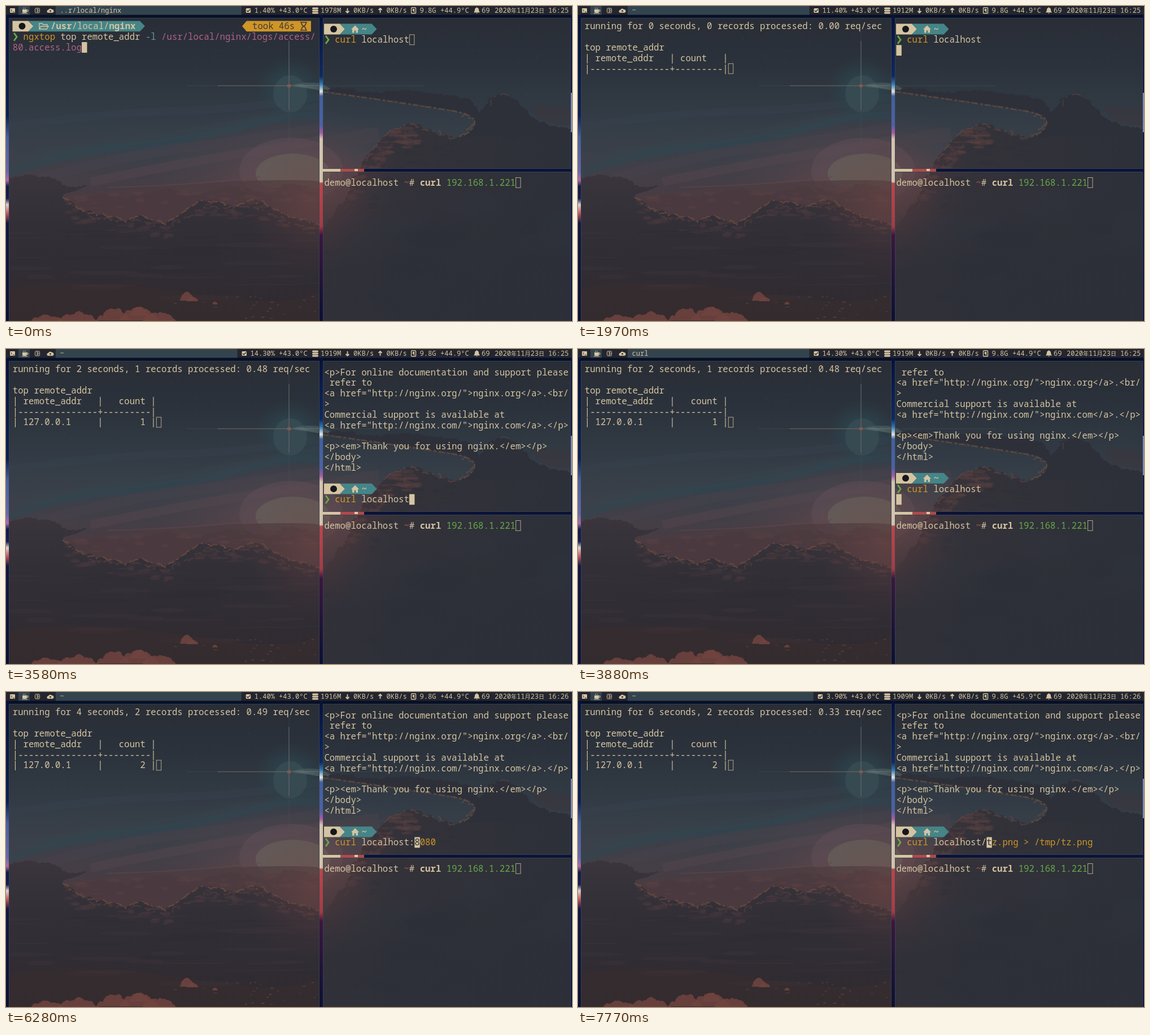
Write an HTML page that moves like this. It is 1002 px wide and 559 px high and loops after 8000 ms.

```html
<!DOCTYPE html>
<html lang="en">
<head>
<meta charset="utf-8">
<title>Terminal session</title>
<style>
html, body { margin: 0; width: 100%; height: 100%; overflow: hidden; background: #23262f; }
svg { display: block; width: 1002px; height: 559px; }
text { white-space: pre; font: 15.68px "Noto Sans Mono", "DejaVu Sans Mono", monospace; }
.bar text { font-size: 12.1px; }
.bar .cjk { font: 10px "Noto Sans CJK SC", "Noto Sans CJK JP", "Noto Sans CJK", sans-serif; }
</style>
</head>
<body>
<svg viewBox="0 0 1002 559">
  <defs>
    <linearGradient id="sky" gradientUnits="userSpaceOnUse" x1="0" y1="21" x2="0" y2="360">
      <stop offset="0" stop-color="#292d36"/><stop offset=".25" stop-color="#2b323b"/>
      <stop offset=".52" stop-color="#333c46"/><stop offset=".7" stop-color="#3a4049"/>
      <stop offset=".85" stop-color="#443e46"/><stop offset="1" stop-color="#4a3b40"/>
    </linearGradient>
    <radialGradient id="glow" gradientUnits="userSpaceOnUse" cx="505" cy="305" r="250" gradientTransform="matrix(1 0 0 .5 0 152)">
      <stop offset="0" stop-color="#76504f" stop-opacity=".6"/><stop offset="1" stop-color="#5a444c" stop-opacity="0"/>
    </radialGradient>
    <radialGradient id="ember" gradientUnits="userSpaceOnUse" cx="545" cy="350" r="130">
      <stop offset="0" stop-color="#7c4a44" stop-opacity=".38"/><stop offset="1" stop-color="#5a3a3c" stop-opacity="0"/>
    </radialGradient>
    <radialGradient id="halo">
      <stop offset=".3" stop-color="#2c4851" stop-opacity=".8"/><stop offset="1" stop-color="#2b424b" stop-opacity="0"/>
    </radialGradient>
    <linearGradient id="ground" x2="0" y2="1">
      <stop offset="0" stop-color="#3a353c"/><stop offset=".35" stop-color="#322f37"/><stop offset="1" stop-color="#2f2a2f"/>
    </linearGradient>
    <linearGradient id="bank">
      <stop offset="0" stop-color="#45363b"/><stop offset=".3" stop-color="#343239"/><stop offset="1" stop-color="#2c3039"/>
    </linearGradient>
    <linearGradient id="low" gradientUnits="userSpaceOnUse" x1="0" y1="300" x2="0" y2="470">
      <stop offset="0" stop-color="#2c2f38" stop-opacity="0"/><stop offset="1" stop-color="#2c2f38" stop-opacity=".8"/>
    </linearGradient>
    <linearGradient id="seam" gradientUnits="userSpaceOnUse" x1="0" y1="16" x2="0" y2="559">
      <stop offset="0" stop-color="#07123a"/><stop offset=".2" stop-color="#0e2a60"/>
      <stop offset=".225" stop-color="#2f76b0"/><stop offset=".25" stop-color="#dfe4df"/>
      <stop offset=".265" stop-color="#41609f"/><stop offset=".36" stop-color="#4b62a6"/>
      <stop offset=".385" stop-color="#a65aa0"/><stop offset=".405" stop-color="#d3c3ad"/>
      <stop offset=".545" stop-color="#d3c3ad"/><stop offset=".55" stop-color="#b8474a"/>
      <stop offset=".69" stop-color="#a23c46"/><stop offset=".72" stop-color="#3a1740"/><stop offset="1" stop-color="#0a1034"/>
    </linearGradient>
    <linearGradient id="side" gradientUnits="userSpaceOnUse" x1="0" y1="16" x2="0" y2="559">
      <stop offset="0" stop-color="#07123a"/><stop offset=".33" stop-color="#0c2050"/>
      <stop offset=".4" stop-color="#4a609f"/><stop offset=".51" stop-color="#6568a8"/>
      <stop offset=".54" stop-color="#b06aa5"/><stop offset=".56" stop-color="#101a4a"/>
      <stop offset=".6" stop-color="#181d4c"/><stop offset=".62" stop-color="#ddd0d0"/>
      <stop offset=".65" stop-color="#b9525c"/><stop offset=".68" stop-color="#111742"/><stop offset="1" stop-color="#0a1034"/>
    </linearGradient>
  </defs>
  <g id="scene"></g>
  <g id="screen"></g>
</svg>
<script>
const CREAM = '#d5c4a1', TEAL = '#458588', AMBER = '#cf9527', GREEN = '#68a84a',
      PINK = '#b16286', DARK = '#2b2e37';
const LOOP = 8000, CW = 9.408, RH = 18.83;
const $ = id => document.getElementById(id);

// ---------- wallpaper ----------
let seed = 7;
const rand = (a, b) => a + (b - a) * ((seed = (seed * 16807) % 2147483647) / 2147483647);
const path = (d, fill, more = '') => `<path d="${d}" fill="${fill}" ${more}/>`;
const rect = (x, y, w, h, fill, more = '') =>
  `<rect x="${x}" y="${y}" width="${w}" height="${h}" fill="${fill}" ${more}/>`;
const oval = (x, y, rx, ry, fill, more = '') =>
  `<ellipse cx="${x}" cy="${y}" rx="${rx}" ry="${ry}" fill="${fill}" ${more}/>`;
const line = (d, color, width, alpha = 1, more = '') =>
  path(d, 'none', `stroke="${color}" stroke-width="${width}" opacity="${alpha}" ${more}`);
const many = (n, draw) => Array.from({ length: n }, (_, i) => draw(i)).join('');
const parse = points => points.split(' ').map(p => p.split(',').map(Number));

// Turns a coarse outline into a chain of small puffs.
function puffs(points, size) {
  const pts = parse(points);
  let [x, y] = pts[0], d = `M${x} ${y}`;
  for (const [px, py] of pts.slice(1)) {
    const n = Math.ceil(Math.hypot(px - x, py - y) / size);
    for (let k = 1; k <= n; k++) {
      const wob = k < n ? size * .3 : 0, r = (size * rand(.6, 1)).toFixed(1);
      const qx = x + (px - x) * k / n + rand(-wob, wob), qy = y + (py - y) * k / n + rand(-wob, wob);
      d += `A${r} ${r} 0 0 1 ${qx.toFixed(1)} ${qy.toFixed(1)}`;
    }
    [x, y] = [px, py];
  }
  return d;
}
const rim = (points, color, width, alpha) =>
  line(puffs(points, 8), color, width, alpha, 'stroke-dasharray="13 5 4 9 19 7"');

// Scatters short brush dabs below an outline.
function dabs(points, n, depth, color, alpha) {
  const pts = parse(points);
  return many(n, () => {
    const i = Math.floor(rand(0, pts.length - 1)), k = rand(0, 1);
    const [[ax, ay], [bx, by]] = [pts[i], pts[i + 1]];
    return oval(ax + (bx - ax) * k, ay + (by - ay) * k + rand(0, depth), rand(4, 13), rand(1, 4), color, `opacity="${alpha}"`);
  });
}

function scene() {
  const bands = [
    ['M0 300Q90 262 210 250T420 214T560 196', '#2d4752', 13, .45],
    ['M0 285Q120 250 230 238T560 178', '#35464f', 16, .35],
    ['M60 306Q220 262 330 250T560 215', '#4a434c', 18, .4],
    ['M150 312Q280 285 380 268T560 238', '#57464e', 16, .4],
    ['M0 215Q160 190 300 186T560 160', '#38434d', 14, .35],
    ['M560 250Q610 232 660 228', '#48434b', 26, .5]
  ];
  const shore = '100,340 128,360 160,372 190,375 212,384 238,372 282,388 318,364 345,345 372,348 402,358 438,345 470,358 508,376 560,390';
  const bankTop = '600,345 625,292 650,256 672,230 690,218 718,210 745,221 795,236';
  const peak = '838,192 848,178 860,163 874,158 888,158 912,178 932,198 962,215 1002,217';
  const trail = 'M560 152Q640 163 700 172T790 186Q826 192 830 206Q826 226 800 232';
  const redPuffs = [[70, 557, 38, 9], [125, 554, 42, 11], [190, 548, 30, 10], [235, 546, 34, 12],
    [272, 553, 36, 10], [320, 515, 12, 8], [330, 520, 10, 4], [370, 527, 5, 2.5], [235, 542, 16, 7]];
  return rect(0, 0, 1002, 559, 'url(#sky)') +
    rect(0, 0, 1002, 559, 'url(#glow)') +
    bands.map(b => line(...b)).join('') +
    many(45, () => oval(rand(5, 1000), rand(24, 190), .6, .6, '#59636c', 'opacity=".6"')) +
    // rising sun
    oval(505, 292, 92, 58, '#65515a', 'opacity=".4"') +
    oval(508, 297, 66, 35, '#66605b', 'opacity=".75"') +
    path('M100 338Q300 314 440 310T560 318V400H100Z', '#4d3c41', 'opacity=".75"') +
    line('M180 322Q340 318 450 303', '#64494a', 2, .5) +
    path(puffs('105,346 160,336 215,344 270,328 330,337 400,322 450,330 500,318 560,326', 13) + 'V400H105Z', '#4a3a3f', 'opacity=".6"') +
    dabs('120,338 300,328 450,322 555,325', 45, 24, '#5c4346', .35) +
    // bright star
    oval(502, 148, 62, 58, 'url(#halo)') +
    oval(503, 156, 30, 33, '#3b4e55', 'opacity=".7"') +
    line('M320 141.5H740', '#5d5a58', 1, .35) + line('M375 141.5H555', '#7b6c62', 1.5, .6) +
    line('M501 45V250', '#565d60', 1.2, .3) + line('M501 62V184', '#6c7070', 1.8, .5) +
    oval(501, 141.5, 3.5, 3, '#80594e') +
    many(16, i => line(`M${508 + i} ${140 + i % 5}Q${530 + i} ${134 + i} ${558 + i * 2} ${138 + i}`, '#627676', 1, .4)) +
    // cloud arm and its lit underside
    path(puffs('560,150 600,147 650,155 700,150 760,157 800,162 825,170 ' + peak, 9) +
      'V300H800L800 232Q828 222 830 206Q820 190 790 186Q700 172 560 153Z', '#2d3039') +
    line(trail, '#70543f', 2, .75, 'stroke-dasharray="11 4 5 3"') +
    line(trail, '#574542', 5, .35, 'stroke-dasharray="5 6 3 4"') +
    rim('858,178 864,162 876,158 890,160', '#68493f', 1.5, .6) +
    rim('806,196 822,200 822,214 806,228', '#69503f', 2, .6) +
    path('M930 178Q975 174 1002 186V212Q965 212 940 198Z', '#3c343b', 'opacity=".5"') +
    // lower right bank
    path(puffs('560,400 ' + bankTop + ' 850,232 1002,240', 10) + 'V560H560Z', 'url(#bank)') +
    dabs('612,318 650,258 690,220 730,214', 60, 34, '#5a4140', .4) +
    dabs('640,330 680,285 730,245 800,240', 30, 40, '#30303a', .5) +
    rim(bankTop, '#694640', 2, .65) +
    rim('600,362 628,310 656,275 690,240 730,228', '#5a403f', 3, .4) +
    // lower left bank
    path(puffs('0,308 30,302 62,303 90,310 108,321 143,319', 10) + 'L124 328L102 334' +
      puffs(shore, 10).replace('M', 'L') + 'V560H0Z', 'url(#ground)') +
    dabs(shore, 80, 26, '#4e3b3f', .4) +
    rim(shore, '#76503f', 1.8, .7) +
    rim('104,346 160,380 238,382 285,396 350,358 440,358 510,388 558,398', '#60443f', 2.5, .45) +
    many(40, () => oval(rand(0, 560), rand(395, 520), rand(25, 80), rand(1, 5), rand(0, 1) < .5 ? '#3d343a' : '#2d2b33', 'opacity=".38"')) +
    many(30, () => oval(rand(610, 1002), rand(330, 559), rand(25, 70), rand(12, 32), rand(0, 1) < .5 ? '#343942' : '#2b2e37', 'opacity=".22"')) +
    rect(0, 220, 1002, 340, 'url(#ember)') +
    rect(561, 294, 441, 265, 'url(#low)') +
    path('M0 500Q150 480 330 510T560 505V559H0Z', '#3d2e2f', 'opacity=".4"') +
    redPuffs.map(([x, y, rx, ry]) => path(puffs(`${x - rx},${y + ry} ${x - rx / 2},${y - ry / 2} ${x},${y - ry} ${x + rx / 2},${y - ry / 2} ${x + rx},${y + ry}`, 9) + 'Z', '#70443f', 'opacity=".85"')).join('') +
    many(26, () => oval(rand(290, 555), rand(515, 557), rand(1, 4), rand(.8, 1.6), '#634340', 'opacity=".5"')) +
    // bright gaps between the windows
    rect(0, 15, 1002, 6, '#081027') + rect(0, 16, 5, 543, 'url(#side)') +
    rect(1000, 16, 2, 543, '#0a1440') + rect(1000, 154, 2, 70, '#7f8db5') +
    rect(555, 16, 6, 543, 'url(#seam)') + rect(561, 289, 441, 5, '#0a1238') +
    rect(561, 289, 34, 5, CREAM) + rect(592, 289, 42, 5, '#b04a4b') + rect(617, 289, 6, 4, '#dcc9a8') +
    [[5, 21, 550, 545], [561, 21, 439, 268], [561, 294, 439, 270]].map(([x, y, w, h]) =>
      rect(x + .5, y + .5, w - 1, h - 1, 'none', 'stroke="#3c4450" stroke-opacity=".8"')).join('');
}

// ---------- terminal parts ----------
const esc = s => s.replace(/&/g, '&amp;').replace(/</g, '&lt;');
const span = ([s, color = CREAM, weight = 400]) => `<tspan fill="${color}" font-weight="${weight}">${esc(s)}</tspan>`;
const text = (x, y, ...spans) => `<text x="${x}" y="${y}">${spans.map(span).join('')}</text>`;
const pane = (x, top) => ({
  row: (r, ...spans) => r < 0 ? '' : text(x, top + r * RH + 14.9, ...spans),
  cursor: (r, c, solid) => solid
    ? rect(x + c * CW, top + r * RH, CW, RH, CREAM)
    : rect(x + c * CW + .5, top + r * RH + .5, CW - 1, RH - 1, 'none', `stroke="${CREAM}" stroke-opacity=".8"`)
});
const left = pane(11.8, 26.4), upper = pane(563.4, 31.6), lower = pane(563.4, 304);

function badge(x, y, end) {
  return path(`M${x} ${y}h28l9 9.4l-9 9.4h-28z`, CREAM) +
    path(`M${x + 28} ${y}H${end - 9}l9 9.4l-9 9.4H${x + 28}l9-9.4z`, TEAL) +
    `<circle cx="${x + 17}" cy="${y + 9.4}" r="6" fill="#15171c"/>`;
}
const chevron = (x, y) => line(`M${x + 2.5} ${y + 2.5}l5 7l-5 7`, GREEN, 2.8);
const house = (x, y) => path(`M${x} ${y + 7}l7-7l7 7h-2v6h-3.5v-4h-3v4H${x + 2}v-6z`, CREAM);

// Last value whose start time has passed.
const at = (t, steps) => steps.filter(s => s[0] <= t).pop()[1];

const PAGE = `<p>For online documentation and support please
 refer to
<a href="http://nginx.org/">nginx.org</a>.<br/
>
Commercial support is available at
<a href="http://nginx.com/">nginx.com</a>.</p>

<p><em>Thank you for using nginx.</em></p>
</body>
</html>`.split('\n');

function leftPane(t) {
  const focus = t < 1160;
  if (t < 520) {
    return badge(11.5, 26.4, 246) +
      line('M59 40V31h5l2 2h7v3M59 41l3-5h13l-3 5z', CREAM, 1.4) +
      text(79, 41.3, ['/usr', CREAM, 700], ['/local/'], ['nginx', CREAM, 700]) +
      path('M418 35.8l8-9.4H540V45.2H426z', AMBER) + text(436, 41.3, ['took 46s', '#3f3a3a']) +
      line('M521 29h12M521 43h12M523 29q0 5 4 7q-4 2-4 7M531 29q0 5-4 7q4 2 4 7', '#3f3a3a', 1.6) +
      chevron(11.6, 45.2) +
      left.row(1, ['  '], ['ngxtop', AMBER], [' top remote_addr '], ['-l', '#5f9a92'], [' /usr/local/nginx/logs/access/', PINK]) +
      left.row(2, ['80.access.log', PINK]) +
      (t < 380 ? left.cursor(2, 13, true) : left.cursor(3, 0, true));
  }
  const [sec, count, rate] = at(t, [[520, [0, 0, '0.00']], [2480, [2, 1, '0.48']], [4420, [4, 2, '0.49']], [6490, [6, 2, '0.33']]]);
  return left.row(0, [`running for ${sec} seconds, ${count} records processed: ${rate} req/sec`]) +
    left.row(2, ['top remote_addr']) +
    left.row(3, [`| remote_addr   | ${count ? '  count' : 'count  '} |`]) +
    left.row(4, ['|---------------+---------|']) +
    (count ? left.row(5, [`| 127.0.0.1     |       ${count} |`]) : '') +
    left.cursor(count ? 5 : 4, 27, focus);
}

function shell(row, typed, hint, cursor, solid) {
  const y = 31.6 + row * RH, next = row + 1, end = 2 + typed.length;
  return badge(563, y, 656.5) + house(611, y + 3) + text(629.5, y + 14.9, ['~', CREAM, 700]) + chevron(563.5, y + RH) +
    upper.row(next, ['  '], [typed.slice(0, 4), AMBER], [typed.slice(4)]) +
    (cursor ? upper.cursor(next, end, solid) : '') +
    (hint ? upper.row(next, [' '.repeat(end)], [hint[0], DARK], [hint.slice(1), AMBER]) : '');
}

function upperPane(t) {
  const page = shift => PAGE.map((s, i) => upper.row(i + shift, [s])).join('');
  const cmd = 'curl localhost';
  if (t < 1970) return shell(0, cmd, '', true, t >= 1210);
  if (t < 2050) return shell(0, cmd) + upper.cursor(2, 0, true);
  if (t < 2090 || (t >= 3920 && t < 4000)) return page(2) + upper.cursor(12, 0, true);
  if (t >= 3840 && t < 3920) return page(-1) + shell(10, cmd) + upper.cursor(12, 0, true);
  const [typed, hint = ''] = at(t, [
    [2090, ['']], [3580, [cmd]], [4000, ['']], [4910, [cmd]], [6280, [cmd + ':', '8080']],
    [6640, [cmd + ':/']], [7190, [cmd + ':', '8080']], [7350, [cmd]], [7770, [cmd + '/', 'tz.png > /tmp/tz.png']]
  ]);
  return page(0) + shell(11, typed, hint, true, true);
}

const lowerPane = () =>
  lower.row(0, ['demo@localhost '], ['~', '#a9594f'], ['# '], ['curl', CREAM, 700], [' 192.168.1.221', GREEN]) +
  lower.cursor(0, 36, false);

function statusBar(t) {
  const title = at(t, [[0, '..r/local/nginx'], [380, 'ngxtop'], [1160, '~'], [2010, 'curl'], [2090, '~'], [3880, 'curl'], [4000, '~']]);
  const cpu = at(t, [[0, '1.40'], [230, '1.90'], [1470, '11.40'], [2720, '14.30'], [3960, '7.30'], [5220, '1.40'], [6400, '3.40'], [7710, '3.90']]);
  const mem = at(t, [[0, 1978], [230, 1912], [2720, 1919], [3960, 1912], [5220, 1916], [6400, 1909]]);
  const heat = at(t, [[0, 44], [230, 45], [1470, 44], [3960, 45], [5220, 44], [7710, 45]]);
  const x = cpu.length > 4 ? 432.5 : 439.7, put = (px, s) => text(px, 12, [s]);
  const arrow = (px, dir) => line(`M${px} ${8 - 4 * dir}v${8 * dir}m-3 ${-3 * dir}l3 ${3 * dir}l3 ${-3 * dir}`, CREAM, 1.8);
  const cjk = (px, s) => `<text class="cjk" x="${px}" y="12" fill="${CREAM}">${s}</text>`;
  return '<g class="bar">' + rect(0, 0, 1002, 15.5, '#23262f') +
    rect(22, 0, 20, 15.5, '#34444f') + rect(88, 0, x - 23 - 88, 15.5, '#34444f') +
    rect(7, 4, 9, 8, CREAM, 'rx="1"') + line('M8.5 6l2 2l-2 2M12 10.5h3', DARK, 1) +
    path('M29 6h8v4q0 2-2 2h-4q-2 0-2-2zM28 12.5h10v1H28z', CREAM) + line('M37 7h2v2.5h-2M31 5V3M34 5V3', CREAM, 1) +
    rect(51.5, 4, 8, 8, 'none', `stroke="${CREAM}" rx="1.5"`) + line('M54 6h3v4h-3M54.5 8h2', CREAM, 1) +
    path('M75 12a2.5 2.5 0 0 1 0-5a3.5 3.5 0 0 1 6-1a3 3 0 0 1 1 6z', CREAM) + line('M78.5 11V7.5m-2 2l2-2l2 2', '#23262f', 1) +
    put(95.5, title) +
    rect(x - 15, 4, 8.5, 8, CREAM, 'rx="1.5"') + line(`M${x - 13.5} 8l2 2l4-4`, '#23262f', 1.3) +
    put(x, cpu + '%') + put(483, '+43.0°C') +
    many(3, i => rect(542, 2.5 + i * 4, 11, 3.2, CREAM, 'rx="1.6"')) +
    put(557, mem + 'M') + arrow(604.5, 1) + put(615, '0KB/s') + arrow(662.5, -1) + put(673.5, '0KB/s') +
    rect(717.5, 3, 8, 10, 'none', `stroke="${CREAM}" stroke-width="1.3" rx="1"`) + line('M723.5 11l-2-2', CREAM, 1.2) +
    oval(721.5, 7, 2, 2, CREAM) + put(732.5, '9.8G') + put(769, `+${heat}.9°C`) +
    path('M828 11.5q2-2 2-5a3.5 3.5 0 0 1 7 0q0 3 2 5zM832 12.5h3q-1.5 2-3 0zM833 2h1v2h-1z', CREAM) +
    put(842, '69') + put(865, '2020') + cjk(894, '年') + put(904, '11') + cjk(918.5, '月') + put(928.5, '23') + cjk(943, '日') +
    put(960, t < 3960 ? '16:25' : '16:26') + '</g>';
}

$('scene').innerHTML = scene();
let shown = '';
function frame() {
  const t = performance.now() % LOOP;
  const now = statusBar(t) + leftPane(t) + upperPane(t) + lowerPane();
  if (now !== shown) $('screen').innerHTML = shown = now;
  requestAnimationFrame(frame);
}
frame();
</script>
</body>
</html>
```
